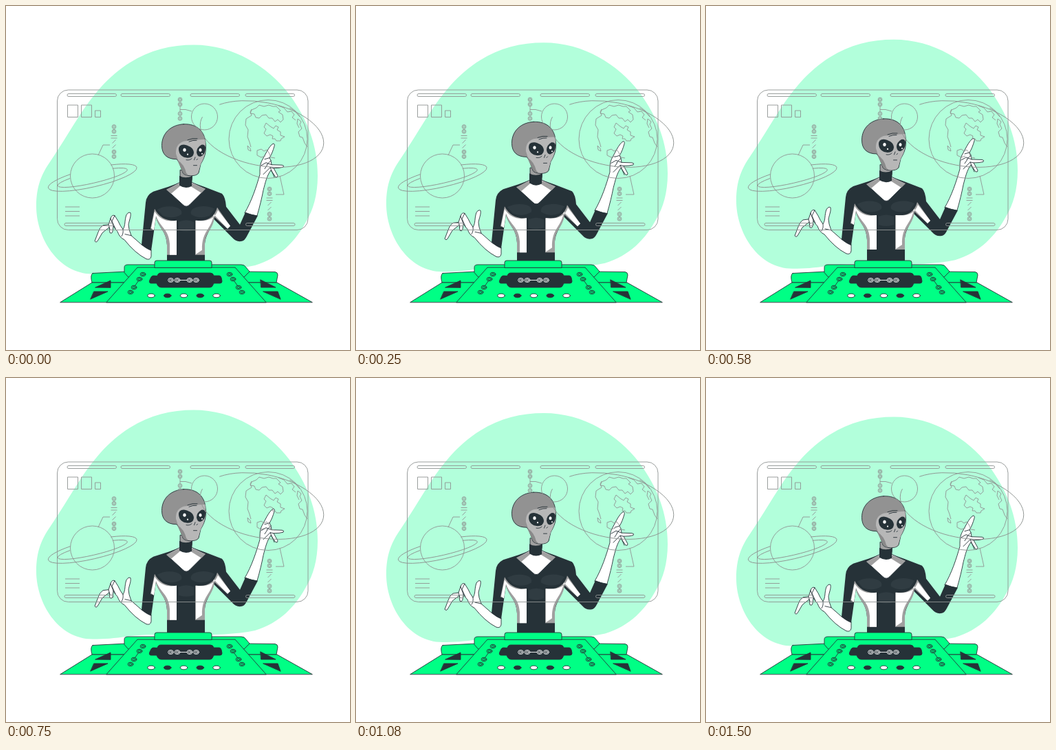
These frames come from a looping animation (500x500 px, 1540 ms). An HTML page:

```html
<!DOCTYPE html>
<html lang="en">
<head>
<meta charset="utf-8">
<title>Alien at the console</title>
<style>
  html, body { margin: 0; width: 100%; height: 100%; overflow: hidden; background: #fff; }
  svg { display: block; width: 100vw; height: 100vh; }
  .ink { fill: #263238; }
  .soft { fill: #303c42; }
  .white { fill: #fff; }
  .green { fill: #00ff85; }
  .shade { fill: #a0a0a0; }
  .edge { stroke: #263238; stroke-width: .9; stroke-linejoin: round; stroke-linecap: round; }
  .line { fill: none; }
  #screen { fill: none; stroke: #8f9492; stroke-width: .9; stroke-linejoin: round; }
</style>
</head>
<body>
<svg viewBox="0 0 500 500">
  <g class="float">
    <path fill="#b2ffdb" d="M273 56.500C331 56.500 381 88.500 411 127.500C438 163.500 453 203 453 247C453 275 446 297 437 312C421 342 398 366 362 377C335 383 300 383 270 384C230 384 207 381.500 177 385.500C157 388.500 143 389.500 126 389.500C75 389.500 44 336 44 291C44 262 52 243.500 64 226.500C79 204 91 184 103.500 164.500C124 132 148 102 180.500 82C209 64 240 56.500 273 56.500Z"/>
  </g>

  <g class="float">
    <g transform="translate(0 .7)">
      <!-- right forearm and hand -->
      <path class="white edge" d="M347 300C357 283 364 262 369 244C369 236 369 230 372 224L379 211Q384 202 388 199.500Q391 199 390 203C388 210 386 215 383 220L385 224L386 230L401 230.500Q405 231 403 233.500Q398 235 389 235L395 246Q395 249 392 248L385 238C379 246 377 256 374 267Q371 283 365 304Z"/>
      <path class="line edge" d="M376 222L383 220M371 231L378 227L386 230M374 244L384 234L389 235M380 230L376 236M385 224L379 230M384 234L390 248"/>
      <!-- left forearm and hand -->
      <path class="white edge" d="M198 347L182 333Q178 323 178 317C179 311 182 305 181 300Q178 298 175 303C172 311 174 318 170 324Q166 319 163 312L158 304Q154 302 152 308L149 317L141 318Q136 321 134 328L129 341Q131 344 133 341L140 329L150 321L151 329Q154 331 155 327L156 319Q159 324 162 327Q165 336 172 339Q188 359 204 367Q210 369 211 363V354Z"/>
      <path class="line edge" d="M149 317L151 324M152 308L156 319M158 304L154 312L159 323M170 324Q171 330 168 334M173 331Q178 332 182 333"/>
      <!-- torso -->
      <path class="ink" d="M252 256L236 262L214 269Q204 274 203 285L197 346Q203 352 211 355L218 306C222 323 233 325 234 347V395H289V345C290 330 300 322 302 309L329 336Q335 343 343 341Q347 340 350 334L366 304Q357 303 348 299L340 317L320 291Q319 277 314 272L288 262L271 256Z"/>
      <path class="white edge" d="M252 256L233 266L257 288Q262 293 267 288L290 265L271 256Z"/>
      <path class="shade" d="M252 257L233 266L240 272L253 261ZM271 257L290 265L284 271L268 261Z"/>
      <path class="shade" d="M216 294L210 323L215 325L218 306C222 323 233 325 234 347V361H248V311Q226 313 216 294Z"/>
      <path class="white" d="M216 298L211 322L215 325L218 304C224 321 237 324 238 345V361H248V311Q227 315 216 298Z"/>
      <path class="shade" d="M307 292L326 319L322 323L303 306C301 325 289 327 289 347V361H275V311Q301 314 307 292Z"/>
      <path class="white" d="M308 296L326 319L322 323L302 302C299 324 284 326 285 354L276 360V311Q302 314 308 296Z"/>
      <path class="soft" d="M220 295Q233 288 248 292Q257 295 255 302Q243 310 228 304ZM303 294Q290 288 276 292Q267 295 269 302Q281 310 296 304ZM251 313Q262 308 273 313V325Q262 329 251 325Z"/>
      <!-- head -->
      <path class="shade edge" d="M253 238V252H270V240Z"/>
      <path class="ink" d="M252 246Q261 251 271 246L270 261Q261 266 252 260Z"/>
      <path class="edge" fill="#929292" d="M258 171C279 170 289 183 290 198C292 214 287 222 283 229L280 242Q277 246 269 246Q260 246 257 242C254 233 252 226 248 222C234 222 226.500 215 226.500 202C226.500 184 240 172 258 171Z"/>
      <path fill="#b7b7b7" d="M289.500 193Q271 194 258 196Q246 200 247 214L250 223Q257 234 259 242Q263 246 270 245.500Q278 245 279.500 241L283 229C288 220 291 213 289.500 193Z"/>
      <path fill="#8a8a8a" d="M249 223Q259 229 262 242L265 245Q258 245 256 239Z"/>
      <path class="ink" d="M251 208Q251 200 260 201Q273 204 273 213Q272 220 264 220Q252 219 251 208ZM290 205Q289 200 284 201Q277 205 277 212Q278 219 283 218Q290 215 290 205Z"/>
      <g class="white">
        <ellipse cx="259.500" cy="208.500" rx="2.200" ry="2.600"/><circle cx="264" cy="215" r="1.100"/>
        <ellipse cx="282.500" cy="208.500" rx="2" ry="2.500"/><circle cx="285" cy="214" r="1"/>
      </g>
      <path class="line edge" d="M264 194Q271 191 278 192M266 196.500Q272 194 277 194.500M275 219L273.500 223M277 223L278.500 221.500M272.500 231H277.500M262 223Q267 224 270 221"/>
    </g>
  </g>

  <g id="screen">
    <rect x="74.500" y="122" width="364.500" height="203.500" rx="16"/>
    <path d="M89.500 144h15v17.500h-15zM109.500 144h15v17.500h-15zM129.500 152h8v9.500h-8zM86 292h21M86 298.500h21M86 305h21"/>
    <circle cx="125.500" cy="247" r="32"/>
    <!-- dashes hide the parts of each orbit that pass behind -->
    <g transform="translate(125.700 249.500) rotate(-13)">
      <ellipse rx="66" ry="13.500" pathLength="360" stroke-dasharray="231 78 51"/>
      <ellipse rx="52" ry="8" pathLength="360" stroke-dasharray="217 105 38"/>
    </g>
    <ellipse transform="translate(372 186) rotate(11)" rx="91" ry="46" pathLength="360" stroke-dasharray="186.500 25.500 148"/>
    <circle cx="288.500" cy="161" r="19"/>
    <path d="M134 217L141 202H151M253 150.500H261L270 153M398 247L404 274H392"/>
    <circle cx="381" cy="193.500" r="57"/>
    <path d="M357 150l-2 4 2 5-8 5-1 9 4 7-1 10 3 8 2 7M357 151l7-3 4-4 7 2 7-2 6 2 5 0 6 6-3 2 6 4 1 7-4 4-4-4-4 3-4-5-5 0-4-5-6 1-4 4-5-1-2-5-6-1zM378 170l-3 6 3 3-3 6 4 4 5-2 4 2-1 4 4 0 2 3 6 0 1-3 5-3-6-2 0-5-5-3 2-4-4-2-3 4-5-3zM396 145l8 3 5 6 6-1 4 5-3 4 5 4M424 164l5 4-2 4 3 6-5 5 2 7 4 1 3 8 4 6M424 164l-1 7 3 6M412 148l7 4 8 9M351 203l4 4 1 4-4-2zM365 210l6-2 4 3 4-2 3 4 3 7 6 1M365 210l0 7 6 3 6-2"/>
  </g>

  <g class="edge">
    <path class="green" d="M126 388.500L175 386H343L391 386.500Q395 387 395 391L393 402H125Q122 391 126 388.500Z"/>
    <path class="green" d="M79 430.600L125 402H394L445 430.600Z"/>
    <path class="green" d="M172 387V380Q172 376 177 376H342Q347 376 349 380L354 386L346 394H178Z"/>
    <path class="green" d="M146 430.600L191 380H333L378 430.600Z"/>
    <path class="green" d="M216 380V373Q216 370 219 370H296Q299 370 299 373V380Z"/>
    <path class="ink" d="M130 409L152 399V409ZM128 415H148L123 426ZM370 398L392 409H371ZM374 415H395L399 426Z"/>
    <path class="ink" d="M220 392Q221 388 225 388H297Q301 388 302 392H310Q312 392 313 395L314 400Q314 403 311 403H302L300 407Q299 409 296 409H226Q221 409 219 403H211Q207 403 209 398L211 394Q212 392 214 392Z"/>
    <g id="lamps"></g>
  </g>
</svg>
<script>
  const NS = 'http://www.w3.org/2000/svg';
  const screen = document.getElementById('screen');
  const lamps = document.getElementById('lamps');

  function add(parent, tag, attrs) {
    const el = document.createElementNS(NS, tag);
    for (const key in attrs) el.setAttribute(key, attrs[key]);
    parent.append(el);
  }

  function ring(parent, cx, cy, rx, ry, stroke) {
    const paint = stroke ? { stroke } : {};
    for (const k of [1, .5]) {
      add(parent, 'ellipse', { cx, cy, rx: rx * k, ry: ry * k, fill: 'none', ...paint });
    }
  }

  function bar(x, y) {
    add(screen, 'rect', { x, y, width: 71.5, height: 4, rx: 2 });
  }

  function readout(x, y) {
    [0, 6.8, 36.5, 43.3].forEach(dy => ring(screen, x, y + dy, 2.9, 2.9));
    add(screen, 'path', {
      d: `M${x - 4.5} ${y + 13}h9m-9 3.500h9M${x - 2.5} ${y + 24}l5-5m-5 12l5-5`
    });
  }

  [89, 167, 268, 348].forEach(x => bar(x, 127.5));
  [85, 348.5].forEach(x => bar(x, 315.5));
  readout(157, 175.5);
  readout(383, 266);
  [136, 143, 156.5, 163.5].forEach(y => ring(screen, 253, y, 2.9, 2.9));
  add(screen, 'path', { d: 'M253 146V153.500' });

  // Mirrored chains of lamps on the console
  for (const side of [-1, 1]) {
    const at = d => 262 + side * d;
    [[63, 390], [68, 397], [76, 409], [81, 416]].forEach(([d, y]) =>
      ring(lamps, at(d), y, 3.9, 2.8));
    add(lamps, 'path', { d: `M${at(69.5)} 399.500L${at(74.5)} 406.500` });
  }
  [239.5, 249, 267, 276.5].forEach(x => ring(lamps, x, 398.5, 3.9, 3, '#fff'));
  add(lamps, 'path', { d: 'M253 398.500H263', stroke: '#fff' });
  for (let i = 0; i < 5; i++) {
    add(lamps, 'ellipse', {
      cx: 211 + i * 23.75, cy: 421, rx: 5.3, ry: 2.8, class: i % 2 ? 'ink' : 'white'
    });
  }

  // Linear float: up and back in 1.5 s, stepped at 24 per second
  const LOOP = 1540, CYCLE = 1500, RISE = 10, STEP = 1000 / 24;
  const floats = document.querySelectorAll('.float');
  const start = performance.now();

  function draw(now) {
    const t = Math.max(0, now - start) % LOOP;
    const held = Math.min(CYCLE, Math.floor((t + 4) / STEP) * STEP);
    const lift = RISE * (1 - Math.abs(1 - 2 * held / CYCLE));
    floats.forEach(el => el.setAttribute('transform', `translate(0 ${-lift.toFixed(3)})`));
    requestAnimationFrame(draw);
  }
  draw(start);
</script>
</body>
</html>
```
